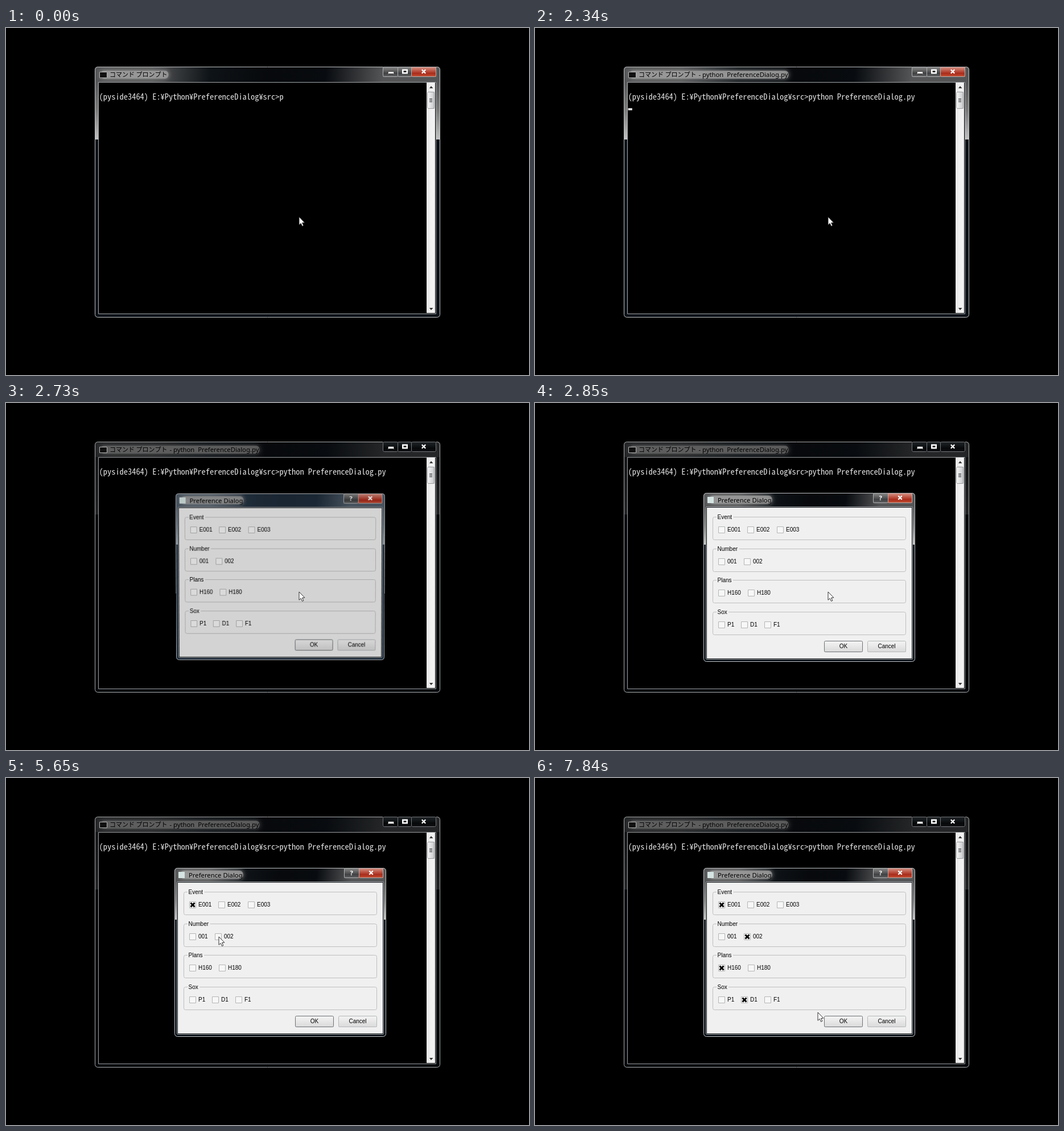
An HTML page with a canvas that plays this animation: 919x610 px, repeating every 7990 ms.

```html
<!DOCTYPE html>
<html lang="ja">
<head>
<meta charset="utf-8">
<title>Preference Dialog</title>
<style>
html, body { margin: 0; width: 100%; height: 100%; overflow: hidden; background: #000; }
canvas { display: block; }
</style>
</head>
<body>
<canvas id="stage" width="919" height="610"></canvas>
<script>
const LOOP = 7990;
const stage = document.getElementById('stage');
const screen = stage.getContext('2d');
const buffer = document.createElement('canvas');
buffer.width = stage.width;
buffer.height = stage.height;
const bufferCtx = buffer.getContext('2d');
let g = screen;

const UI = '10px "Liberation Sans", Arial, sans-serif';
const TITLE = '11.3px "Noto Sans", "Open Sans", sans-serif';
const KANA = '11px "Noto Sans CJK JP", "Noto Sans CJK", sans-serif';
const MONO = '14.4px "Noto Sans Mono CJK JP", "Liberation Mono", monospace';

// Console grid
const CELL = 7.2, ROW = 16.2, COL0 = 163.6, ROW0 = 126;
const PROMPT = '(pyside3464) E:¥Python¥PreferenceDialog¥src>';
const COMMAND = 'python PreferenceDialog.py';
const CARET_START = 850, BLINK = 530, ENTER = 1670;

const OPEN = 2610, OPEN_STEP = 120;

const GROUPS = {
  Event: ['E001', 'E002', 'E003'],
  Number: ['001', '002'],
  Plans: ['H160', 'H180'],
  Sox: ['P1', 'D1', 'F1']
};
const TICKED = { E001: 5080, '002': 5800, H160: 6490, D1: 7600 };

// The pointer is sampled at a fixed interval
const SAMPLE = 142, SAMPLE_PHASE = 4640;
const REST = { x: 515, y: 332 };
const MOVES = [
  { from: 3800, to: 3930, x: 489, y: 316 },
  { from: 4100, to: 4640, x: 360, y: 237 },
  { from: 4640, to: 4860, x: 329, y: 222 },
  { from: 5080, to: 5500, x: 374, y: 279 },
  { from: 5900, to: 6340, x: 327, y: 336 },
  { from: 6400, to: 6628, x: 371, y: 379 },
  { from: 6628, to: 6900, x: 369, y: 391 },
  { from: 7560, to: 7760, x: 497, y: 412 }
];

const clamp = v => Math.min(1, Math.max(0, v));
const smooth = v => v * v * (3 - 2 * v);

function rect(x, y, w, h, fill) {
  g.fillStyle = fill;
  g.fillRect(x, y, w, h);
}

function outline(x, y, w, h, r, color) {
  g.beginPath();
  g.roundRect(x + .5, y + .5, w - 1, h - 1, r);
  g.strokeStyle = color;
  g.lineWidth = 1;
  g.stroke();
}

function text(s, x, y, font, color = '#000') {
  g.font = font;
  g.fillStyle = color;
  g.fillText(s, x, y);
}

function textWidth(s, font) {
  g.font = font;
  return g.measureText(s).width;
}

function poly(points, fill) {
  g.beginPath();
  for (const [x, y] of points) g.lineTo(x, y);
  g.closePath();
  g.fillStyle = fill;
  g.fill();
}

// Linear gradient with evenly spaced colours
function ramp(x0, y0, x1, y1, ...colors) {
  const gradient = g.createLinearGradient(x0, y0, x1, y1);
  colors.forEach((color, i) => gradient.addColorStop(i / (colors.length - 1), color));
  return gradient;
}

function cross(x, y, r, width, color) {
  g.beginPath();
  g.moveTo(x - r, y - r);
  g.lineTo(x + r, y + r);
  g.moveTo(x + r, y - r);
  g.lineTo(x - r, y + r);
  g.strokeStyle = color;
  g.lineWidth = width;
  g.stroke();
}

// Glass frame; the bright reflection on the sides ends at `split`
function glass({ x, y, w, h, top, split, glowEnd, active = true, tint }) {
  const r = x + w;
  const tone = active ? '#555657' : '#242627';
  g.save();
  g.beginPath();
  g.roundRect(x, y, w, h, 5);
  g.clip();
  rect(x, y, w, h, active ? '#0c1218' : '#06090c');
  rect(x, y, w, top - y, ramp(x, y, r, y + 40, tone, tone, '#0e1317', '#07090c', '#080b0f', tone, tone));
  const sides = active ? ramp(0, top, 0, split, '#565758', '#7c7c7c', '#c2c2c2')
                       : ramp(0, top, 0, split, '#141617', '#232527');
  rect(x, top, 7, split - top, sides);
  rect(r - 7, top, 7, split - top, sides);
  if (tint) rect(x, y, w, h, tint);

  g.shadowColor = active ? '#a0a0a0' : '#606060';
  g.shadowBlur = 9;
  g.beginPath();
  g.roundRect(x + 10, top - 20, glowEnd - x - 10, 14, 6);
  g.fillStyle = active ? 'rgba(155,155,155,.8)' : 'rgba(98,98,98,.8)';
  g.fill();
  g.restore();
  outline(x, y, w, h, 5, active ? '#bfc1c3' : '#aaacae');
}

function captionButton(x, y, w, h, red, active) {
  const colors = red ? ['#d89a8e', '#c26152', '#a92b1a', '#c9573a']
    : active ? ['#8c8c8c', '#686868', '#3f4042', '#68696a']
    : ['#222527', '#15181a', '#060809', '#101214'];
  rect(x, y, w, h, ramp(0, y, 0, y + h, ...colors));
  outline(x, y, w, h, 2, active ? '#aeb1b3' : '#74777a');
}

function drawScrollbar() {
  rect(739, 96, 15, 405, ramp(739, 0, 754, 0, '#e6e6e6', '#f0f0f0', '#f3f3f3'));
  poly([[744, 106], [747, 102], [750.5, 106]], '#333');
  poly([[744, 492], [750.5, 492], [747, 496]], '#333');
  rect(740, 112, 13, 30, ramp(740, 0, 753, 0, '#fafafa', '#e0e0e1', '#c4c6c9'));
  outline(740, 112, 13, 30, 2, '#979a9d');
  for (let y = 124; y < 131; y += 2.5) rect(744, y, 5, 1.2, '#45484b');
}

// First word in one burst, a few letters of the file name, then completion
function typedLength(t) {
  if (t < 150) return 1;
  if (t < 1130) return Math.min(7, 2 + Math.floor((t - 150) / 80));
  return t < 1530 ? 8 + Math.floor((t - 1130) / 135) : COMMAND.length;
}

function drawConsole(t) {
  const active = t < OPEN, running = t >= ENTER;
  const label = 'コマンド プロンプト', suffix = running ? ' - python  PreferenceDialog.py' : '';
  const suffixX = 183 + textWidth(label, KANA);
  const glowEnd = suffixX + textWidth(suffix, TITLE) + 1;
  glass({ x: 156, y: 68, w: 607, h: 441, top: 95, split: 196, glowEnd, active });
  outline(162, 95, 594, 408, 0, active ? '#a3a7aa' : '#9a9da0');
  rect(163, 96, 592, 406, '#000');

  rect(164, 77, 14, 11, '#111');
  outline(164, 77, 14, 11, 0, '#b5b5b5');
  text(label, 182, 86, KANA);
  text(suffix, suffixX, 86, TITLE);

  captionButton(662, 68, 27, 18, false, active);
  captionButton(688, 68, 25, 18, false, active);
  captionButton(712, 68, 44, 18, active, active);
  rect(671.5, 77, 10, 4, '#fff');
  outline(671, 76, 11, 5, 1, '#444');
  rect(696, 72.5, 10, 8, '#fff');
  rect(698.5, 75, 5, 3, '#333');
  cross(734, 76.5, 3.2, 2.3, '#fff');
  drawScrollbar();

  const line = PROMPT + COMMAND.slice(0, typedLength(t));
  [...line].forEach((c, i) => text(c, COL0 + i * CELL, ROW0, MONO, '#e4e4e4'));

  const blinkOn = Math.floor((t - CARET_START) / BLINK) % 2 === 0;
  if (t >= CARET_START && active && blinkOn) {
    const col = running ? 0 : line.length, row = running ? 1 : 0;
    rect(COL0 + col * CELL, ROW0 - 1.2 + row * ROW, CELL, 3.6, '#e8e8e8');
  }
}

function drawGroup(name, options, y, t) {
  outline(312, y, 340, 41, 3, '#bebebe');
  rect(319, y, textWidth(name, UI) + 4, 1, '#f0f0f0');
  text(name, 320.5, y + 3.5, UI);
  let x = 322;
  for (const label of options) {
    const left = Math.round(x), top = y + 17;
    rect(left, top, 12, 12, '#f7f7f7');
    outline(left, top, 12, 12, 0, '#b4b5b6');
    if (t >= TICKED[label]) cross(left + 6, top + 6, 3.5, 3, '#000');
    text(label, left + 16, top + 9, UI);
    x += textWidth(label, UI) + 28;
  }
}

function pushButton(label, x, w, border) {
  rect(x, 418, w, 20, ramp(0, 418, 0, 438, '#f3f3f3', '#ececec', '#e2e2e2', '#dadada'));
  outline(x, 418, w, 20, 2, border);
  text(label, x + (w - textWidth(label, UI)) / 2, 431, UI);
}

function drawDialog(t, tint) {
  const title = 'Preference Dialog';
  const glowEnd = 322 + textWidth(title, TITLE);
  glass({ x: 296, y: 158, w: 372, h: 297, top: 183, split: 249, glowEnd, tint });
  outline(300, 182, 364, 269, 1, '#a5a9ac');
  outline(301, 183, 362, 267, 0, '#15181b');
  rect(302, 184, 360, 265, '#f0f0f0');
  rect(303, 165, 11, 11, '#d5e4e2');
  text(title, 321, 174.5, TITLE);
  captionButton(594, 158, 27, 18, false, true);
  captionButton(620, 158, 43, 18, true, true);
  text('?', 604.5, 171, 'bold ' + TITLE, '#fff');
  cross(641.5, 166.5, 3.2, 2.3, '#fff');
  Object.entries(GROUPS).forEach(([name, options], i) =>
    drawGroup(name, options, Math.round(200 + 55.7 * i), t));
  pushButton('OK', 508, 68, '#6c7074');
  pushButton('Cancel', 584, 68, '#b3b6b8');
}

// Tilted, half-transparent dialog while it opens; k = 0 is fully open
function drawOpening(k) {
  const top = Math.round(158 + 4 * k), h = Math.round(297 - 18 * k);
  g.globalAlpha = 1 - .47 * k;
  for (let i = 0; i < h; i++) {
    const u = i / h, inset = (7 + 5 * u) * k;
    g.drawImage(buffer, 296, 158 + 297 * u, 372, 297 / h, 296 + inset, top + i, 372 - 2 * inset, 1);
  }
  g.globalAlpha = 1;
}

function pointerAt(t) {
  const held = SAMPLE_PHASE + Math.floor((t - SAMPLE_PHASE) / SAMPLE) * SAMPLE;
  let { x, y } = REST;
  for (const move of MOVES) {
    const k = smooth(clamp((held - move.from) / (move.to - move.from)));
    x += (move.x - x) * k;
    y += (move.y - y) * k;
  }
  return [Math.round(x), Math.round(y)];
}

function drawPointer(x, y) {
  const shape = [[0, 0], [0, 14.3], [3.2, 11.4], [5.5, 16.4], [7.8, 15.4], [5.6, 10.5], [9.8, 10.2]];
  poly(shape.map(([dx, dy]) => [x + dx, y + dy]), '#fff');
  g.strokeStyle = '#1a1a1a';
  g.lineWidth = .9;
  g.stroke();
}

function draw(t) {
  rect(0, 0, 919, 610, '#000');
  drawConsole(t);
  const step = Math.floor((t - OPEN) / OPEN_STEP);
  if (step >= 2) drawDialog(t);
  else if (step >= 0) drawOpening(.25 ** step);
  drawPointer(...pointerAt(t));
}

g = bufferCtx;
drawDialog(0, 'rgba(75,110,145,.35)');
g = screen;

const start = performance.now();
function tick() {
  draw((performance.now() - start) % LOOP);
  requestAnimationFrame(tick);
}
tick();
</script>
</body>
</html>
```
